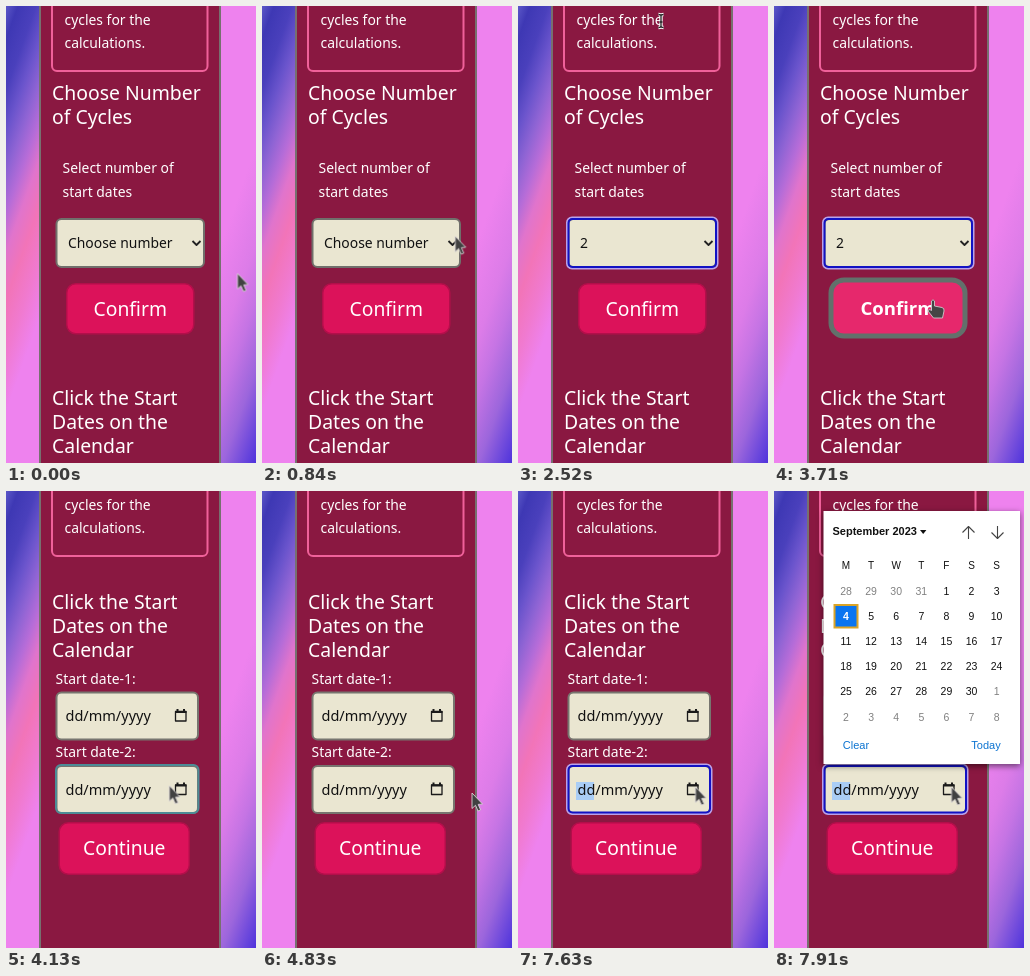
These frames come from a looping animation (250 px wide and 457 px high, 8000 ms). An HTML page:

```html
<!DOCTYPE html>
<html lang="en">
<head>
<meta charset="utf-8">
<title>Cycle dates form</title>
<style>
  html, body { margin: 0; width: 100%; height: 100%; overflow: hidden; background: #ee82ee; }
  svg { display: block; width: 250px; height: 457px; }
  text { font: 13.9px "Noto Sans", sans-serif; fill: #fff; white-space: pre; }
  .head { font-size: 19.4px; }
  .btn { font-size: 19.3px; text-anchor: middle; }
  .bold { font-weight: 600; font-size: 18.6px; }
  .ink { fill: #111; }
  .opt { font-size: 13.6px; }
  .date { font-size: 14.5px; }
  .tip { font-size: 11.5px; fill: #454545; }
  .cal text { font: 10.5px "Liberation Sans", Arial, sans-serif; fill: #111; text-anchor: middle; }
  .cal .title { font-size: 11px; font-weight: bold; text-anchor: start; }
  .cal .link { font-size: 11px; fill: #0d74d1; }
  .cal .day { font-size: 10px; font-weight: 500; }
  .cal .dim { fill: #808080; }
  .cal .today { fill: #fff; font-weight: bold; }
  .float { filter: drop-shadow(0 2px 3px rgba(0, 0, 0, .55)); }
</style>
</head>
<body>
<svg id="stage" viewBox="0 0 250 457"></svg>
<script>
const LOOP = 8000, STEP = 70;
const LEAD = 6; // changes land just before their tick, clear of rounding
const OPEN = 1120, CHOSEN = 2520, HOVER = 3570, SENT = 3990, TIP = 6300, PICK = 7630, CALENDAR = 7700;
const CREAM = '#eae6d1', BLUE = '#1212c4';

const text = (x, y, s, cls = '') => `<text x="${x}" y="${y}" class="${cls}">${s}</text>`;
const lines = (x, y, gap, cls, ...rows) => rows.map((s, i) => text(x, y + i * gap, s, cls)).join('');
const box = (x, y, w, h, r, fill, stroke = 'none', sw = 0) =>
  `<rect x="${x + sw / 2}" y="${y + sw / 2}" width="${w - sw}" height="${h - sw}" rx="${r}" fill="${fill}" stroke="${stroke}" stroke-width="${sw}"/>`;
const path = (d, stroke, sw, fill = 'none') =>
  `<path d="${d}" stroke="${stroke}" stroke-width="${sw}" fill="${fill}" stroke-linejoin="round"/>`;
// Group that is visible only during the given [from, to] spans
const during = (spans, ...parts) => `<g data-show='${JSON.stringify(spans)}'>${parts.join('')}</g>`;

// Diagonal backdrop: stops measured along x + SLANT * y
const SLANT = 0.357, REACH = 413, SCALE = REACH / (1 + SLANT * SLANT);
const bands = [
  [0, '#5c58c8'], [12, '#3e38b4'], [30, '#4a40bc'], [45, '#6a54cc'], [60, '#8f64d4'],
  [74, '#b56cd8'], [88, '#e074cc'], [105, '#f274b8'], [125, '#f07ad0'], [145, '#ee82ee'],
  [300, '#ee82ee'], [335, '#dc7ce8'], [355, '#c574e4'], [380, '#9c66dc'], [400, '#6c48dc'], [413, '#4f33dc']
];
const backdrop = `<defs><linearGradient id="sky" gradientUnits="userSpaceOnUse" x1="0" y1="0" x2="${SCALE}" y2="${SCALE * SLANT}">
  ${bands.map(([s, c]) => `<stop offset="${s / REACH}" stop-color="${c}"/>`).join('')}</linearGradient></defs>
  <rect width="250" height="457" fill="url(#sky)"/>`;

const panel = box(33, -10, 182, 480, 0, '#8a1841', '#77706f', 2)
  + box(45, -20, 157.5, 86, 5, 'none', '#f0619a', 2)
  + lines(58.5, 18.5, 23.5, '', 'cycles for the', 'calculations.');

const button = (x, y, w, h, label) =>
  box(x, y, w, h, 9, '#dc125a', '#b30e4a', 1.5) + text(x + w / 2, y + 32.5, label, 'btn');

const focusRing = (x, y, w, h) =>
  box(x - 1.5, y - 1.5, w + 3, h + 3, 5, 'none', '#b9a2ea', 2) + box(x, y, w, h, 4, 'none', BLUE, 2);

const chevron = path('M186.5 235l4 4 4-4', '#222', 1.8);

const chooser = lines(46, 94, 24, 'head', 'Choose Number', 'of Cycles')
  + lines(56.5, 167, 24, '', 'Select number of', 'start dates')
  + box(49.5, 212, 149.5, 50, 5, CREAM, '#706f6b', 2) + chevron
  + during([[0, CHOSEN]], text(62, 242, 'Choose number', 'ink'))
  + during([[CHOSEN, SENT]], text(62, 242, '2', 'ink'))
  + during([[OPEN, SENT]], focusRing(49.5, 212, 149.5, 50))
  + during([[0, HOVER]], button(60, 277, 128.5, 51.5, 'Confirm'))
  + during([[HOVER, SENT]],
      box(54.5, 271.5, 139, 61, 13, '#e6286c', '#62706b', 5), text(124, 309, 'Confirm', 'btn bold'))
  + lines(46, 399, 24, 'head', 'Click the Start', 'Dates on the', 'Calendar');

// Option list; the lit row follows the pointer
const lit = { 0: [[0, 1540]], 9: [[1540, 1610]], 6: [[1610, 1680]], 3: [[1680, 1820]], 2: [[1820, CHOSEN]] };
const option = n => {
  const i = n ? n - 1 : 0, y = 5 + i * 18.2, label = n || 'Choose number';
  const row = text(61, y, label, 'opt ink');
  return lit[n] ? row + during(lit[n], box(50, y - 14, 148, 18.2, 0, '#c9c9cd'), text(61, y, label, 'opt')) : row;
};
const list = `<g class="float">${box(49.5, -20, 149.5, 231, 0, CREAM, '#b5b2a5', 1)}</g>`
  + [0, 2, 3, 4, 5, 6, 7, 8, 9, 10, 11, 12].map(option).join('');

const dateField = (n, y) => text(49.5, y - 8, `Start date-${n}:`)
  + box(49.5, y, 143.5, 49, 5, CREAM, '#77756f', 2)
  + (n === 2 ? during([[PICK, LOOP]], box(58, y + 17, 18, 18, 0, '#a9cdf5')) : '')
  + text(59.5, y + 29.5, 'dd/mm/yyyy', 'ink date')
  + path(`M169.5 ${y + 20}h10.5v9.5h-10.5z`, '#1a1a1a', 1.3)
  + path(`M169 ${y + 20.5}h11.5M171.5 ${y + 17.5}v2M178 ${y + 17.5}v2`, '#1a1a1a', 2);

const dates = lines(46, 118, 24, 'head', 'Click the Start', 'Dates on the', 'Calendar')
  + dateField(1, 200.5) + dateField(2, 274)
  + during([[SENT, 4550], [5530, PICK]], box(49, 273, 144.5, 50, 5, 'none', '#4d8c96', 2))
  + during([[PICK, LOOP]], focusRing(49.5, 274, 143.5, 48.5))
  + button(52.5, 331, 131.5, 53, 'Continue');

const calendar = () => {
  const col = i => 72 + i * 25.1, row = i => 103.5 + i * 25.2;
  let out = `<g class="float">${box(49.5, 20, 196.5, 253, 0, '#fff')}</g>`
    + text(58.5, 44, 'September 2023', 'title')
    + path('M146 39h6.4l-3.2 4z', 'none', 0, '#111')
    + path('M194.5 48V35.5M188.5 41.5l6-6 6 6M223.5 35v12.5M217.5 41.5l6 6 6-6', '#444', 1.1);
  [...'MTWTFSS'].forEach((d, i) => out += text(col(i), 77.5, d, 'day'));
  out += box(59.5, 113, 25, 24.5, 0, '#0a75f0', '#dba426', 2);
  for (let i = 0; i < 42; i++) {
    const n = i - 3, day = n < 1 ? n + 31 : n > 30 ? n - 30 : n;
    out += text(col(i % 7), row(Math.floor(i / 7)), day, n === 4 ? 'today' : n !== day ? 'dim' : '');
  }
  return `<g class="cal">${out}${text(82, 258, 'Clear', 'link')}${text(212, 258, 'Today', 'link')}</g>`;
};

const tooltip = `<g class="float">${box(188, 312, 80, 22, 1, '#fae8b4', '#8d8060', 1)}</g>`
  + text(194, 327, 'Please fill', 'tip');

const arrow = path('M0 0V15.5L3.5 12.3 6 18 8.6 16.9 6.2 11.4 10.5 11Z', '#d8d4d6', .9, '#414141');
const beamShape = 'M-2.5 -6.5Q0 -6.5 0 -5V5Q0 6.5 -2.5 6.5M2.5 -6.5Q0 -6.5 0 -5M2.5 6.5Q0 6.5 0 5M-1.5 1H1.5';
const beam = path(beamShape, '#fff', 3.4) + path(beamShape, '#222', 1.3);
const hand = path('M-1.5 1Q0 -1.5 1.5 1V6L9 7.5Q11.5 8 11 11L9.5 18H0.5L-5 11Q-4.5 8.5 -1.5 10.5Z', '#cfc9cc', .9, '#454545');

document.getElementById('stage').innerHTML = backdrop + panel
  + during([[0, SENT]], chooser)
  + during([[OPEN, CHOSEN]], list)
  + during([[SENT, LOOP]], dates)
  + during([[CALENDAR, LOOP]], calendar())
  + during([[TIP, PICK]], tooltip)
  + '<g id="pointer">'
  + during([[0, CHOSEN], [3010, HOVER], [SENT, LOOP]], arrow)
  + during([[CHOSEN, 3010]], beam)
  + during([[HOVER, SENT]], hand) + '</g>';

const play = (el, frames) => el.animate(frames, { duration: LOOP, iterations: Infinity, delay: -LEAD });

document.querySelectorAll('[data-show]').forEach(el => {
  const spans = JSON.parse(el.dataset.show), frames = [];
  const key = (t, opacity) => frames.push({ offset: t / LOOP, opacity, easing: 'step-end' });
  if (spans[0][0] > 0) key(0, 0);
  for (const [from, to] of spans) { key(from, 1); key(to, 0); }
  if (spans[spans.length - 1][1] < LOOP) key(LOOP, 0);
  play(el, frames);
});

// Pointer moves: first step, last step, x, y
const moves = [
  [210, 560, 212, 246], [700, 910, 187, 225], [1470, 1470, 186, 222], [1540, 1680, 150, 42],
  [1820, 1890, 143, 15], [2940, 3150, 165, 110], [3220, 3570, 161, 286], [3640, 3710, 159, 294],
  [4130, 4270, 172, 296], [4410, 4550, 197, 300], [4690, 4830, 210, 302], [4900, 5110, 214, 308],
  [5320, 5530, 180, 298], [5740, 5740, 177.5, 296]
];
const at = (t, x, y, easing) => ({ offset: t / LOOP, transform: `translate(${x}px, ${y}px)`, easing });
let [px, py] = [231.5, 267.5];
const trail = [at(0, px, py, 'step-end')];
for (const [first, last, x, y] of moves) {
  trail.push(at(first - STEP, px, py, `steps(${(last - first) / STEP + 1})`), at(last, x, y, 'step-end'));
  [px, py] = [x, y];
}
trail.push(at(LOOP, px, py, 'linear'));
play(document.getElementById('pointer'), trail);
</script>
</body>
</html>
```
